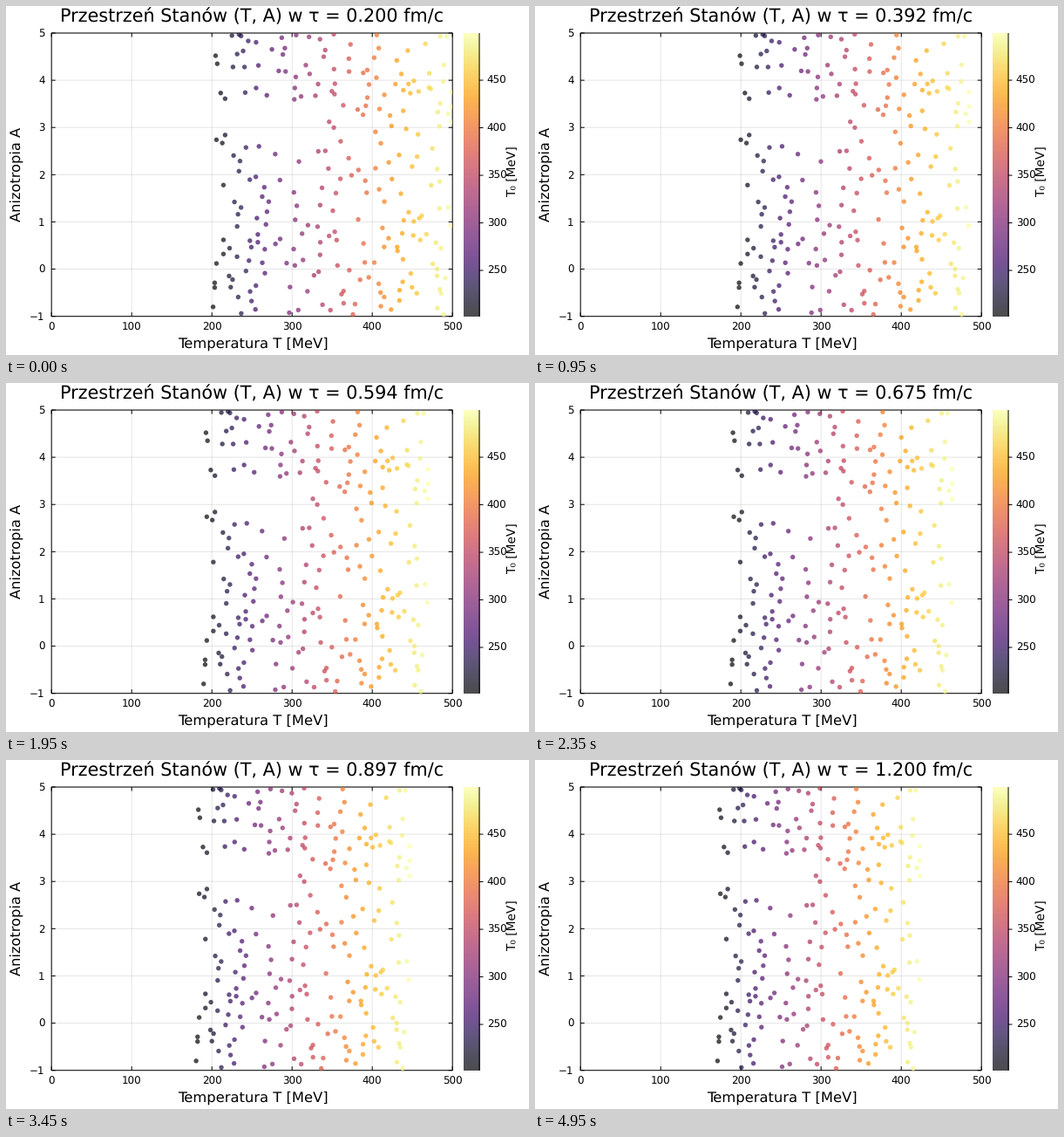
These frames come from a looping animation (600 px wide and 400 px high, 5 s). A matplotlib script:

```python
import numpy as np
import matplotlib.pyplot as plt
from matplotlib.animation import FuncAnimation
from matplotlib.patches import Rectangle

W, H, DPI = 600, 400, 100
FRAMES, INTERVAL = 100, 50
LEFT, RIGHT, TOP, BOTTOM = 52.2, 512.2, 31, 355.7
BAR_LEFT, BAR_RIGHT = 524.5, 543
T_MIN, T_MAX = 201.7, 499.6
ALPHA = 0.7
COUNT = 245
TICK = 4.5

plt.rcParams["font.family"] = "DejaVu Sans"
plt.rcParams["text.hinting"] = "none"

# Coldest points (T, A), which form the dark left edge of the cloud.
COLD = [
    (204.6, 4.52), (206.7, 4.35), (211, 3.73), (216.5, 3.61), (205.7, 2.74),
    (213, 2.67), (216.5, 2.84), (214.4, 1.78), (203.5, -0.29), (203.5, -0.39),
    (205.7, 0.12), (214.4, 0.32), (214.4, 0.62), (201.5, -0.8),
]


def in_gap(temp, aniso):
    """The nearly empty band in the cooler half of the cloud."""
    return temp < 345 and 2.65 < aniso < 3.55


def start_points():
    """Cold edge plus loosely spaced random points over the hotter range."""
    rng = np.random.default_rng(12)
    scale = np.array([0.92, 54])
    points = list(COLD)
    while len(points) < COUNT:
        tries = rng.uniform((221, -1), (500, 5), (2, 2))
        gaps = np.linalg.norm((tries[:, None] - np.array(points)) * scale,
                              axis=2)
        best = tries[gaps.min(axis=1).argmax()]
        if not in_gap(*best):
            points.append(tuple(best))
    return np.array(points).T


def x_of(temp):
    return LEFT + temp / 500 * (RIGHT - LEFT)


def y_of(aniso):
    return BOTTOM - (aniso + 1) / 6 * (BOTTOM - TOP)


def bar_y(temp):
    return BOTTOM - (temp - T_MIN) / (T_MAX - T_MIN) * (BOTTOM - TOP)


def line(xs, ys, alpha=1, z=2):
    ax.plot(xs, ys, color="black", alpha=alpha, lw=0.72, zorder=z,
            solid_capstyle="butt", snap=False)


def label(x, y, text, px, ha="center", **kw):
    return ax.text(x, y, text, fontsize=px * 0.72, ha=ha, va="baseline",
                   rotation_mode="anchor", **kw)


def plot_box(**kw):
    return Rectangle((LEFT, TOP), RIGHT - LEFT, BOTTOM - TOP, **kw)


fig = plt.figure(figsize=(W / DPI, H / DPI), dpi=DPI, facecolor="white")
ax = fig.add_axes([0, 0, 1, 1])

ramp = np.linspace(1, 0, 256)[:, None]
ax.imshow(ramp, cmap="inferno", alpha=ALPHA, aspect="auto",
          extent=(BAR_LEFT, BAR_RIGHT, BOTTOM, TOP))
ax.set_xlim(0, W)
ax.set_ylim(H, 0)
ax.axis("off")

# Grid, box and inward ticks on all four sides
ax.add_patch(plot_box(fill=False, ec="black", lw=0.72, zorder=2, snap=False))
for temp in range(0, 501, 100):
    x = x_of(temp)
    line([x, x], [TOP, BOTTOM], alpha=0.1, z=1)
    line([x, x], [BOTTOM, BOTTOM - TICK])
    line([x, x], [TOP, TOP + TICK])
    label(x, 371.8, str(temp), 11.9)
for aniso in range(-1, 6):
    y = y_of(aniso)
    line([LEFT, RIGHT], [y, y], alpha=0.1, z=1)
    line([LEFT, LEFT + TICK], [y, y])
    line([RIGHT, RIGHT - TICK], [y, y])
    label(44.7, y + 4.2, str(aniso).replace("-", "\u2212"), 11.9, ha="right")

# Colour bar scale
line([BAR_RIGHT, BAR_RIGHT], [TOP, BOTTOM])
for temp in range(250, 451, 50):
    y = bar_y(temp)
    line([BAR_RIGHT, BAR_RIGHT + TICK], [y, y])
    label(551.8, y + 4.2, str(temp), 11.9, ha="left")

label(283, 392, "Temperatura T [MeV]", 16.4)
label(17, 193, "Anizotropia A", 16.3, rotation=90)
label(585.5, 189.5, "T\u2080 [MeV]", 13.8, rotation=90)
title = label(282.3, 18.5, "", 20.75)

temps, anisos = start_points()
dots = ax.scatter(x_of(temps), y_of(anisos), c=temps, cmap="inferno",
                  vmin=T_MIN, vmax=T_MAX, s=(5.4 * 0.72) ** 2, alpha=ALPHA,
                  linewidths=0, zorder=3)
dots.set_clip_path(plot_box(transform=ax.transData))


def update(i):
    s = i / (FRAMES - 1)
    cooling = 1 - 0.147 * s - 0.005 * s * s
    dots.set_offsets(np.column_stack([x_of(temps * cooling), y_of(anisos)]))
    title.set_text(f"Przestrzeń Stanów (T, A) w τ = {0.2 + s:.3f} fm/c")
    return dots, title


anim = FuncAnimation(fig, update, frames=FRAMES, interval=INTERVAL,
                     repeat=True, repeat_delay=0, blit=False)
plt.show()
```
